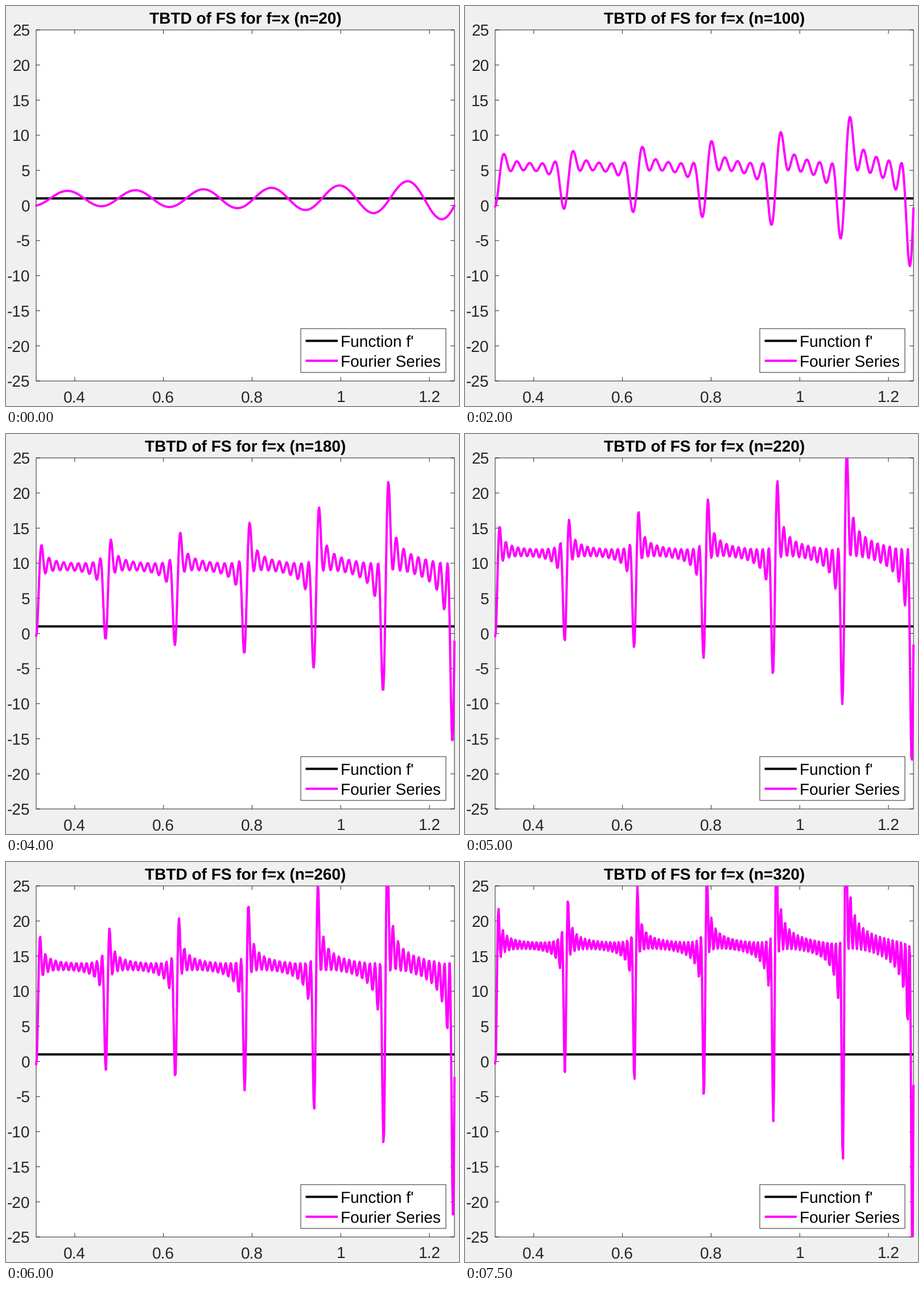
A matplotlib script that plays this animation: 796x703 px, repeating every 8000 ms.

```python
import numpy as np
import matplotlib.pyplot as plt
from matplotlib.animation import FuncAnimation
from matplotlib.patches import Rectangle

W, H, DPI = 796, 703, 100
LEFT, RIGHT, TOP, BOTTOM = 53, 788, 42, 659
INK = "#262626"
MAGENTA = "#ff00ff"
FRAMES, INTERVAL, STEP_N = 16, 500, 20

plt.rcParams["font.family"] = "Liberation Sans"
plt.rcParams["text.hinting"] = "none"
plt.rcParams["path.snap"] = False


def pt(pixels):
    return pixels * 72 / DPI


x = 0.0015725 * np.arange(199, 800)


def to_px(value):
    return LEFT + (value - x[0]) / (x[-1] - x[0]) * (RIGHT - LEFT)


def to_py(value):
    return BOTTOM - (value + 25) / 50 * (BOTTOM - TOP)


def derivative_sum(n):
    """Term-by-term derivative of the series for f=x on (-pi/2, pi/2)."""
    return 1 - (-1) ** n * np.cos((2 * n + 1) * x) / np.cos(x)


# The plotted curve accumulates the partial sums of all steps so far.
curves = np.cumsum([derivative_sum(STEP_N * (i + 1)) for i in range(FRAMES)], axis=0)

fig = plt.figure(figsize=(W / DPI, H / DPI), dpi=DPI, facecolor="#f0f0f0")
ax = fig.add_axes([0, 0, 1, 1])
ax.set_xlim(0, W)
ax.set_ylim(H, 0)
ax.axis("off")


def rule(xs, ys, color=INK, width=1, z=3, cap="butt"):
    return ax.plot(xs, ys, color=color, lw=pt(width), zorder=z,
                   solid_capstyle=cap, solid_joinstyle="round")[0]


def box(x0, y0, x1, y1, z, face="white", edge=INK):
    patch = Rectangle((x0, y0), x1 - x0, y1 - y0, facecolor=face,
                      edgecolor=edge, lw=pt(1), zorder=z)
    return ax.add_patch(patch)


def label(px, py, text, ha="center", color=INK, **kw):
    return ax.text(px, py, text, ha=ha, va="baseline", color=color,
                   fontsize=pt(28), zorder=8, **kw)


box(LEFT, TOP, RIGHT, BOTTOM, 1, edge="none")
box(LEFT, TOP, RIGHT, BOTTOM, 3, face="none")

TICK = 7
for v in (0.4, 0.6, 0.8, 1, 1.2):
    px = to_px(v)
    rule([px, px], [BOTTOM, BOTTOM - TICK])
    rule([px, px], [TOP, TOP + TICK])
    label(px, 696.5, f"{v:g}")
for v in range(-25, 26, 5):
    py = to_py(v)
    rule([LEFT, LEFT + TICK], [py, py])
    rule([RIGHT, RIGHT - TICK], [py, py])
    label(42.5, py + 10, str(v), ha="right")

rule([LEFT, RIGHT], [to_py(1)] * 2, "black", 4, 4)
series = rule([], [], MAGENTA, 4, 5, cap="round")
series.set_clip_path(Rectangle((0, TOP - 0.5), W, BOTTOM - TOP + 1,
                               transform=ax.transData))

box(518, 567, 773, 644, 6)
for py, color, name in ((588.5, "black", "Function f'"),
                        (623.5, MAGENTA, "Fourier Series")):
    rule([526.5, 583], [py, py], color, 4, 7)
    label(588, py + 10, name, ha="left", color="black")

title = label((LEFT + RIGHT) / 2, 31, "", color="black", weight="bold")


def update(i):
    series.set_data(to_px(x), to_py(curves[i]))
    title.set_text(f"TBTD of FS for f=x (n={STEP_N * (i + 1)})")
    return series, title


update(0)
anim = FuncAnimation(fig, update, frames=FRAMES, interval=INTERVAL,
                     repeat=True, repeat_delay=0)
plt.show()
```
